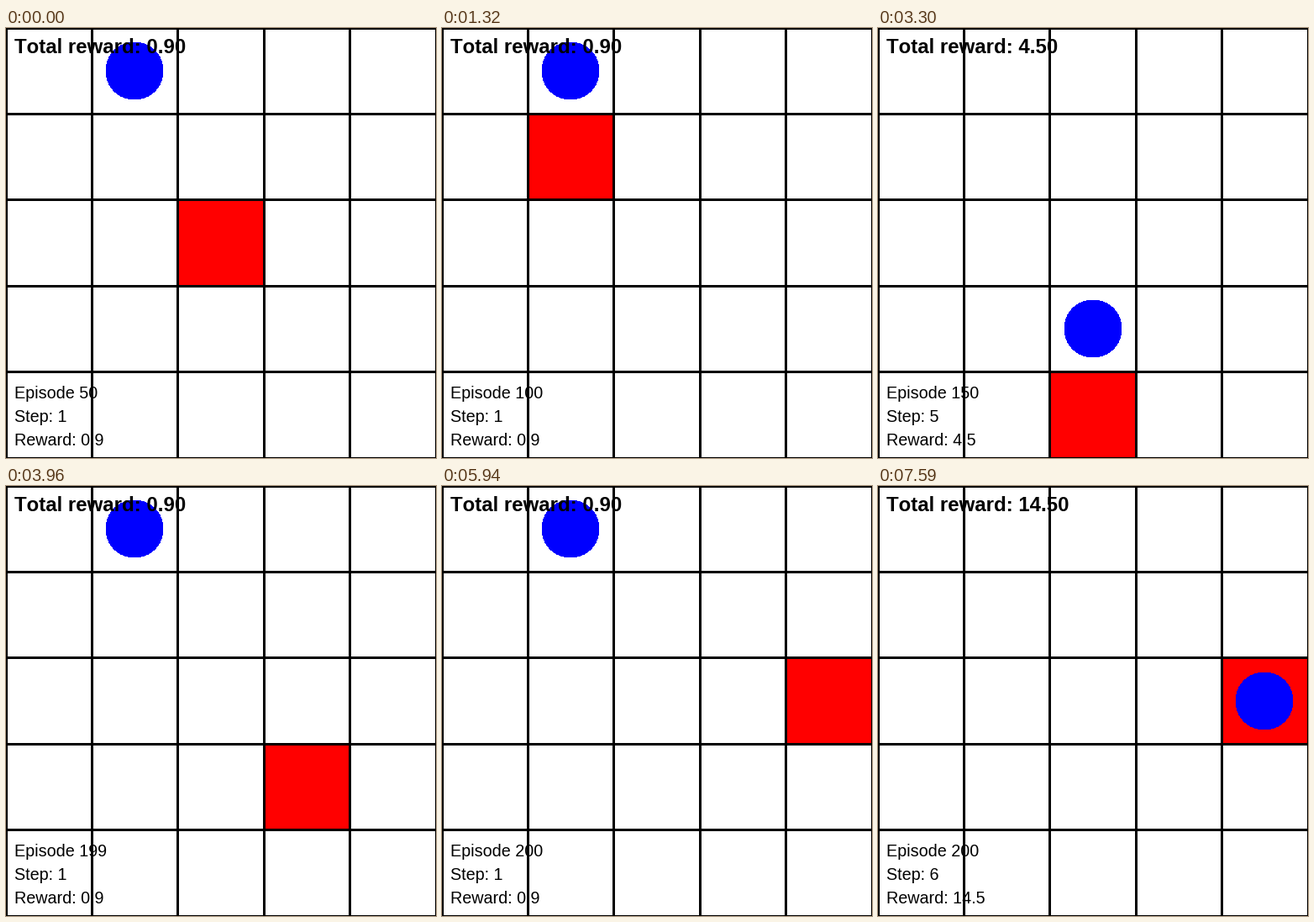
Recreate the animation shown at these times as a matplotlib script. Size 512 by 512 pixels, loop 7.92 s.

```python
import matplotlib.pyplot as plt
from matplotlib.animation import FuncAnimation
from matplotlib.patches import Circle, Rectangle

SIZE, DPI, N = 512, 100, 5
CELL = SIZE / N
STEP_MS = 330

# episode number and goal cell (column, row)
EPISODES = [(50, (2, 2)), (100, (1, 1)), (150, (2, 4)), (199, (3, 3)), (200, (4, 2))]

plt.rcParams["text.kerning_factor"] = 6


def edge(i):
    return int(i * CELL)


def center(cell):
    return tuple(int((c + 0.5) * CELL) for c in cell)


def walk():
    """Each step goes right until the goal column, then down to the goal."""
    for episode, goal in EPISODES:
        last = sum(goal)
        for step in range(1, last + 1):
            col = min(step, goal[0])
            reward = 0.9 * step if step < last else 0.9 * (step - 1) + 10
            yield episode, goal, step, (col, step - col), reward


STATES = list(walk())

fig = plt.figure(figsize=(SIZE / DPI, SIZE / DPI), dpi=DPI, facecolor="white")
ax = fig.add_axes([0, 0, 1, 1])
ax.set_xlim(0, SIZE)
ax.set_ylim(SIZE, 0)
ax.axis("off")


def label(y, px, weight="normal"):
    return ax.text(10, y, "", family="Liberation Sans", weight=weight,
                   size=px * 72 / DPI, color="black", va="baseline", zorder=4)


goal_box = ax.add_patch(Rectangle((0, 0), 1, 1, fc="red", lw=0,
                                  antialiased=False, zorder=1))
for i in range(N + 1):
    p = edge(i) - 1
    for xy, w, h in (((p, 0), 3, SIZE), ((0, p), SIZE, 3)):
        ax.add_patch(Rectangle(xy, w, h, fc="black", lw=0,
                               antialiased=False, zorder=2))
agent = ax.add_patch(Circle((0, 0), 34, fc="blue", lw=0,
                            antialiased=False, zorder=3))

total = label(30, 24, "bold")
info = [label(y, 19.8) for y in (441, 469, 497)]


def draw(k):
    episode, (gx, gy), step, cell, reward = STATES[k]
    x, y = edge(gx), edge(gy)
    goal_box.set_bounds(x, y, edge(gx + 1) - x, edge(gy + 1) - y)
    agent.center = center(cell)
    total.set_text(f"Total reward: {reward:.2f}")
    lines = f"Episode {episode}", f"Step: {step}", f"Reward: {reward:.1f}"
    for text, line in zip(info, lines):
        text.set_text(line)
    return [goal_box, agent, total, *info]


anim = FuncAnimation(fig, draw, frames=len(STATES), init_func=lambda: draw(0),
                     interval=STEP_MS, repeat=True, repeat_delay=0)
plt.show()
```
